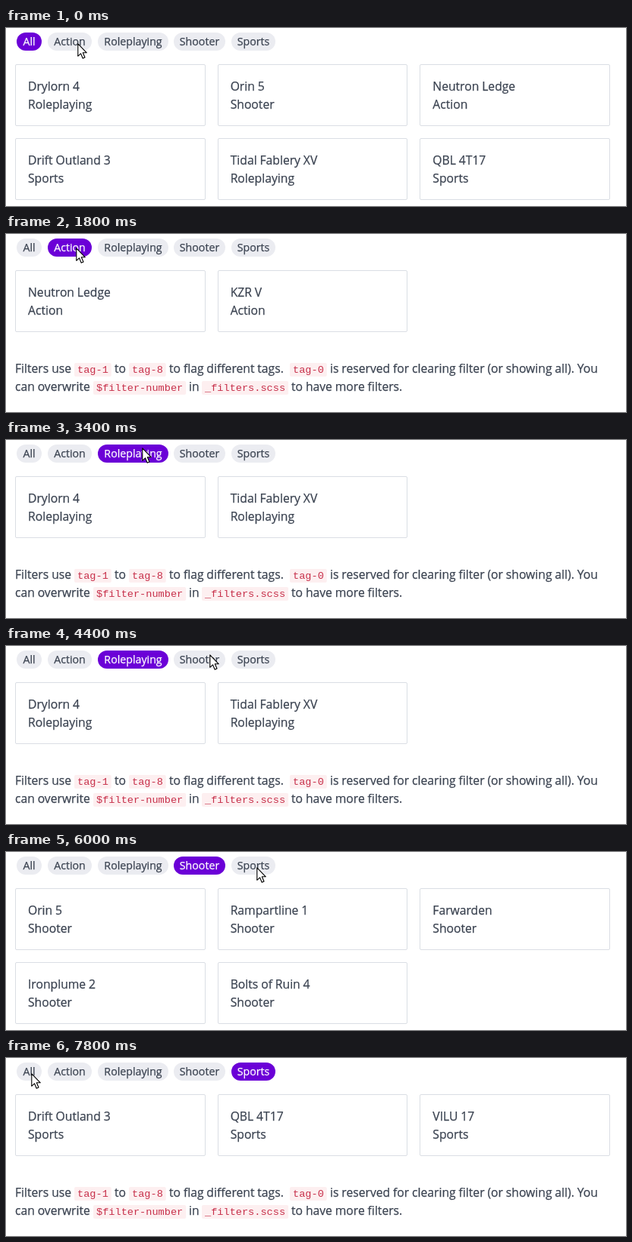
These frames come from a looping animation (817 by 236 pixels, 8 s). An HTML page:

```html
<!DOCTYPE html>
<html lang="en">
<head>
<meta charset="utf-8">
<title>Tag filters</title>
<style>
  html, body { margin: 0; width: 100%; height: 100%; overflow: hidden; background: #fff; }
  svg { display: block; color: #3b4351; }
  text {
    font: 15.7px "Open Sans", "Noto Sans", sans-serif; word-spacing: -.2px; white-space: pre;
    fill: currentColor; stroke: currentColor; stroke-width: .25px;
  }
  .chip rect { fill: #ebecf1; }
  .chip text { font-size: 14.2px; text-anchor: middle; }
  .active { color: #fff; }
  .active rect { fill: #6b00d7; }
  .card { fill: #fff; stroke: #dadee4; }
  .code { color: #c7304a; }
  .code rect { fill: #fdeff0; }
  .code text { font: 13.6px "Liberation Mono", monospace; stroke: none; }
</style>
</head>
<body>
<svg width="817" height="236" viewBox="0 0 817 236">
  <g id="chips"></g>
  <g id="cards"></g>
  <g id="note"></g>
  <path id="cursor" d="M.8 .9V17.3L4.5 13.8L7.2 20.2L10 19L7.3 12.8H12.3Z" fill="#fff" stroke="#000" stroke-width="1.1" stroke-linejoin="round"/>
</svg>
<script>
const LOOP = 8000, TICK = 100, ROW = 98;

// label, left, right, time of selection
const chips = [
  ["All", 14, 47, 0],
  ["Action", 55, 113, 1800],
  ["Roleplaying", 121, 214, 3400],
  ["Shooter", 221, 289, 4900],
  ["Sports", 297, 355, 6600],
];

const games = [
  ["Drylorn 4", "Roleplaying"],
  ["Orin 5", "Shooter"],
  ["Neutron Ledge", "Action"],
  ["Drift Outland 3", "Sports"],
  ["Tidal Fablery XV", "Roleplaying"],
  ["QBL 4T17", "Sports"],
  ["Rampartline 1", "Shooter"],
  ["KZR V", "Action"],
  ["Farwarden", "Shooter"],
  ["Ironplume 2", "Shooter"],
  ["Bolts of Ruin 4", "Shooter"],
  ["VILU 17", "Sports"],
];

// start, steps, x, y, vertical bend
const startPos = [94, 20];
const moves = [
  [600, 1, 92, 18, 0],
  [2100, 5, 188, 10, 0],
  [2600, 1, 179, 10, 0],
  [4000, 1, 200, 11, 0],
  [4200, 1, 252, 11, 0],
  [4400, 1, 268, 11, 0],
  [4600, 1, 269, 11, 0],
  [5200, 1, 276, 15, 0],
  [5400, 7, 330, 20, -11],
  [6900, 9, 42, 21, 5],
  [7800, 1, 33, 20, 0],
];

const $ = id => document.getElementById(id);
const text = (x, y, s) => `<text x="${x}" y="${y}">${s}</text>`;
const rect = (x, y, w, h, r, cls = "") =>
  `<rect class="${cls}" x="${x}" y="${y}" width="${w}" height="${h}" rx="${r}"/>`;
const code = (x, y, s) =>
  `<g class="code">${rect(x, y - 13, s.length * 8.16 + 8, 18, 2)}${text(x + 4, y, s)}</g>`;

function card([name, tag], i) {
  const x = 12 + (i % 3) * 800 / 3, y = 48 + Math.floor(i / 3) * ROW;
  const left = Math.round(x), right = Math.round(x + 752 / 3);
  return rect(left + .5, y + .5, right - left - 1, 81, 1.5, "card")
    + text(x + 17, y + 35, name) + text(x + 17, y + 59, tag);
}

function select(index) {
  const tag = chips[index][0];
  const shown = games.filter(g => !index || g[1] === tag);
  $("chips").innerHTML = chips.map(([label, l, r], i) =>
    `<g class="chip ${i === index ? "active" : ""}">${rect(l, 6, r - l, 24, 12)}${text((l + r) / 2, 23, label)}</g>`
  ).join("");
  $("cards").innerHTML = shown.map(card).join("");
  const rows = Math.ceil(shown.length / 3);
  $("note").setAttribute("transform", `translate(0 ${(rows - 1) * ROW})`);
}

function cursorAt(t) {
  let [x, y] = startPos;
  for (const [start, steps, toX, toY, bend] of moves) {
    if (t < start) break;
    const p = Math.min(1, (Math.floor((t - start) / TICK) + 1) / steps);
    const e = p * p * (3 - 2 * p);
    x += (toX - x) * e;
    y += (toY - y) * e + bend * Math.sin(Math.PI * p);
  }
  return [Math.round(x), Math.round(y)];
}

$("note").innerHTML = [
  text(12, 184, "Filters use"), code(90, 184, "tag-1"), text(143, 184, "to"), code(162, 184, "tag-8"),
  text(215, 184, "to flag different tags."), code(374, 184, "tag-0"),
  text(427, 184, "is reserved for clearing filter (or showing all). You"),
  text(12, 208, "can overwrite"), code(115, 208, "$filter-number"), text(241, 208, "in"),
  code(258, 208, "_filters.scss"), text(376, 208, "to have more filters."),
].join("");

let current = -1;
function draw() {
  const t = performance.now() % LOOP;
  const index = chips.filter(c => c[3] <= t).length - 1;
  if (index !== current) select(current = index);
  $("cursor").setAttribute("transform", `translate(${cursorAt(t)})`);
  requestAnimationFrame(draw);
}
draw();
</script>
</body>
</html>
```
